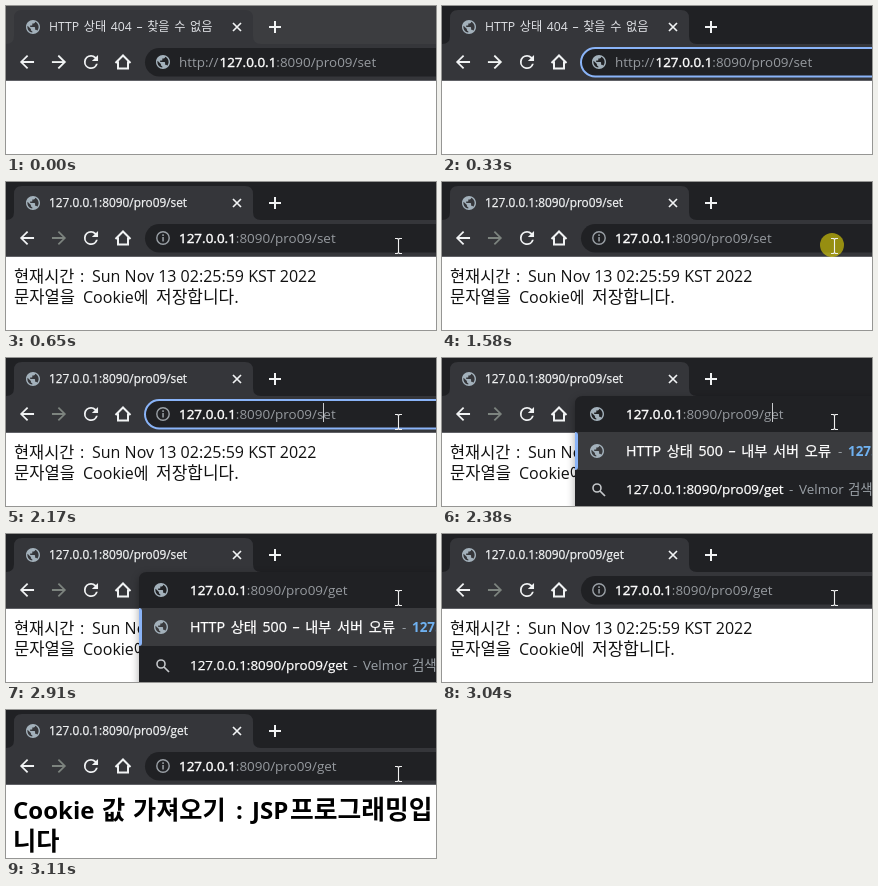
Recreate the animation shown at these times as an HTML page. Size 430 by 148 pixels, loop 3970 ms.

```html
<!DOCTYPE html>
<html lang="ko">
<head>
<meta charset="utf-8">
<title>Cookie</title>
<style>
html, body { margin: 0; width: 100%; height: 100%; overflow: hidden; background: #fff; }
svg { display: block; width: 430px; height: 148px; }
text { font-family: 'Open Sans', 'Noto Sans CJK KR', 'Noto Sans CJK', sans-serif; white-space: pre; }
.tab { font-size: 11.85px; fill: #f1f3f4; stroke: #f1f3f4; stroke-width: .25px; }
.url { font-size: 13.45px; fill: #969a9f; }
.host { fill: #fff; stroke: #fff; stroke-width: .4px; }
.page { font-size: 16px; fill: #111; }
.head { font-size: 24px; font-weight: 700; fill: #000; }
.row { font-size: 13.45px; fill: #fff; }
.strong { stroke: #fff; stroke-width: .25px; }
.line { fill: none; stroke: #f1f3f4; stroke-width: 2; }
.globe { fill: #a3b1bb; }
.caret { fill: #c8cacd; }

/* Each part is shown only during its own window of the loop. */
.t { opacity: 0; animation: 3970ms step-end infinite; }
.idle { animation-name: idle; }
.typed { animation-name: typed; }
.focus1 { animation-name: focus1; }
.caret1 { animation-name: caret1; }
.loaded { animation-name: loaded; }
.tabSet { animation-name: tabSet; }
.urlSet { animation-name: urlSet; }
.pageSet { animation-name: pageSet; }
.click { animation-name: click; }
.focus2 { animation-name: focus2; }
.picked { animation-name: picked; }
.caret2 { animation-name: caret2; }
.cut { animation-name: cut; }
.popup { animation-name: popup; }
.caret3 { animation-name: caret3; }
.navGet { animation-name: navGet; }
.pageGet { animation-name: pageGet; }
@keyframes idle { 0% { opacity: 1 } 1.76% { opacity: 0 } }
@keyframes typed { 0% { opacity: 1 } 14.86% { opacity: 0 } }
@keyframes focus1 { 1.76% { opacity: 1 } 14.86% { opacity: 0 } }
@keyframes caret1 { 1.76% { opacity: 1 } 8.31% { opacity: 0 } }
@keyframes loaded { 14.86%, 100% { opacity: 1 } }
@keyframes tabSet { 14.86% { opacity: 1 } 76.57% { opacity: 0 } }
@keyframes urlSet { 14.86% { opacity: 1 } 56.42% { opacity: 0 } }
@keyframes pageSet { 16.37% { opacity: 1 } 78.33% { opacity: 0 } }
@keyframes click { 39.79% { opacity: 1 } 43.07% { opacity: 0 } }
@keyframes focus2 { 41.3% { opacity: 1 } 58.18% { opacity: 0 } }
@keyframes picked { 41.3% { opacity: 1 } 54.65% { opacity: 0 } }
@keyframes caret2 { 54.65% { opacity: 1 } 56.42% { opacity: 0 } }
@keyframes cut { 56.42% { opacity: 1 } 58.18% { opacity: 0 } }
@keyframes popup { 58.18% { opacity: 1 } 76.57% { opacity: 0 } }
@keyframes caret3 { 58.18% { opacity: 1 } 73.29% { opacity: 0 } }
@keyframes navGet { 76.57%, 100% { opacity: 1 } }
@keyframes pageGet { 78.33%, 100% { opacity: 1 } }
</style>
</head>
<body>
<svg viewBox="0 0 430 148">
  <defs>
    <path id="globe" transform="scale(.7) translate(-12 -12)" d="M12 2C6.48 2 2 6.48 2 12s4.48 10 10 10 10-4.48 10-10S17.52 2 12 2zm-1 17.93c-3.95-.49-7-3.85-7-7.93 0-.62.08-1.21.21-1.79L9 15v1c0 1.1.9 2 2 2v1.93zm6.9-2.54c-.26-.81-1-1.39-1.9-1.39h-1v-3c0-.55-.45-1-1-1H8v-2h2c.55 0 1-.45 1-1V7h2c1.1 0 2-.9 2-2v-.41c2.93 1.19 5 4.06 5 7.41 0 2.08-.8 3.97-2.1 5.39z"/>
    <path id="arrow" transform="scale(.88) translate(-12 -12)" d="M20 11H7.83l5.59-5.59L12 4l-8 8 8 8 1.41-1.41L7.83 13H20z"/>
    <rect id="ring" x="139" y="42" width="320" height="28.5" rx="14.25" fill="none" stroke="#8ab4f8" stroke-width="2"/>
    <filter id="shadow" x="-10%" y="-20%" width="120%" height="140%"><feGaussianBlur stdDeviation="4"/></filter>
  </defs>

  <!-- page -->
  <rect width="430" height="148" fill="#fff"/>
  <g class="t pageSet page">
    <text y="100"><tspan x="8" font-size="16.4">현재시간</tspan><tspan x="74">:</tspan><tspan x="86">Sun Nov 13 02:25:59 KST 2022</tspan></text>
    <text y="121"><tspan x="8" font-size="16.6">문자열을</tspan><tspan x="77">Cookie에</tspan><tspan x="150" font-size="17">저장합니다.</tspan></text>
  </g>
  <g class="t pageGet head">
    <text y="109"><tspan x="7">Cookie</tspan><tspan x="96" font-size="25.2">값</tspan><tspan x="127" font-size="25.2">가져오기</tspan><tspan x="230">:</tspan><tspan x="246">JSP</tspan><tspan x="284" font-size="25.8">프로그래밍입</tspan></text>
    <text x="7" y="140" font-size="25.2">니다</text>
  </g>

  <!-- tab strip -->
  <rect width="430" height="39" fill="#202124"/>
  <rect class="t idle" width="430" height="39" fill="#3c3d40"/>
  <path d="M0 38Q8 38 8 30V12Q8 4 16 4H239Q247 4 247 12V30Q247 38 255 38Z" fill="#35363a"/>
  <use class="globe" href="#globe" x="27" y="21"/>
  <text class="tab t typed" x="43" y="25" style="font-size:12.2px;word-spacing:1.5px;stroke:none;fill:#dfe1e5">HTTP 상태 404 – 찾을 수 없음</text>
  <text class="tab t tabSet" x="43" y="25">127.0.0.1:8090/pro09/set</text>
  <text class="tab t navGet" x="43" y="25">127.0.0.1:8090/pro09/get</text>
  <path class="line" d="M227 17l8 8m0-8l-8 8" style="stroke-width:1.7"/>
  <path class="line" d="M263 21h12m-6-6v12"/>

  <!-- toolbar -->
  <rect y="38" width="430" height="36" fill="#35363a"/>
  <rect y="74" width="430" height="1" fill="#606166"/>
  <use href="#arrow" x="21" y="56" fill="#f1f3f4"/>
  <use href="#arrow" transform="translate(53 56) scale(-1 1)" fill="#7d847f"/>
  <use class="t typed" href="#arrow" transform="translate(53 56) scale(-1 1)" fill="#f1f3f4"/>
  <path transform="translate(85 56) scale(.88) translate(-12 -12)" fill="#f1f3f4" d="M17.65 6.35A7.96 7.96 0 0 0 12 4a8 8 0 1 0 7.73 10h-2.08A6 6 0 1 1 12 6c1.66 0 3.14.69 4.22 1.78L13 11h7V4z"/>
  <path class="line" d="M109.500 57L117 49.500 124.500 57M112 55.500V62.500H122V55.500"/>
  <rect x="139" y="42" width="320" height="28.5" rx="14.25" fill="#202124"/>

  <!-- address bar -->
  <g class="t typed">
    <use class="globe" href="#globe" x="157" y="56"/>
    <text class="url" x="173" y="61">http://<tspan class="host" x="213.500">127.0.0.1</tspan>:8090/pro09/set</text>
  </g>
  <use class="t focus1" href="#ring"/>
  <rect class="t caret1 caret" x="370" y="45" width="1" height="19"/>
  <g class="t loaded">
    <circle class="line" cx="157" cy="56" r="6.2" style="stroke:#9aa0a6;stroke-width:1.4"/>
    <path d="M156.300 55h1.500v4.500h-1.500zM156.300 52.300h1.500v1.600h-1.500z" fill="#9aa0a6"/>
  </g>
  <text class="url t urlSet" x="173" y="61"><tspan class="host">127.0.0.1</tspan>:8090/pro09/set</text>
  <text class="url t cut" x="173" y="61"><tspan class="host">127.0.0.1</tspan>:8090/pro09/et</text>
  <text class="url t navGet" x="173" y="61"><tspan class="host">127.0.0.1</tspan>:8090/pro09/get</text>
  <g class="t picked">
    <rect x="173" y="46" width="157" height="19" fill="#99c8ff"/>
    <text class="url" x="173" y="61" style="fill:#202124">127.0.0.1:8090/pro09/set</text>
  </g>
  <use class="t focus2" href="#ring"/>
  <rect class="t caret2 caret" x="317" y="45" width="1" height="19"/>
  <rect class="t cut caret" x="310" y="45" width="1" height="19"/>

  <!-- suggestions -->
  <g class="t popup">
    <rect x="133" y="41" width="320" height="130" rx="8" opacity=".35" filter="url(#shadow)"/>
    <path d="M133 148V46Q133 38 141 38H430V148Z" fill="#202124"/>
    <rect x="133" y="74" width="297" height="38" fill="#3a3b3e"/>
    <path d="M133 74q3 0 3 3v32q0 3-3 3z" fill="#8ab4f8"/>
    <use class="globe" href="#globe" x="155" y="56"/>
    <text class="url" x="184" y="61"><tspan class="host">127.0.0.1</tspan>:8090/pro09/get</text>
    <use class="globe" href="#globe" x="155" y="93"/>
    <text class="row strong" x="184" y="98" style="font-size:14.2px;word-spacing:2px">HTTP 상태 500 – 내부 서버 오류</text>
    <text class="row" y="98"><tspan x="396" fill="#9aa0a6">-</tspan><tspan x="406" fill="#6fb1f0" font-weight="700">127.0.0.1:8090/pro09/get</tspan></text>
    <path class="line" d="M158 133l5 5" style="stroke:#c4c7ca;stroke-width:1.7"/>
    <circle class="line" cx="155" cy="130" r="4" style="stroke:#c4c7ca;stroke-width:1.6"/>
    <text class="row strong" x="184" y="136">127.0.0.1:8090/pro09/get</text>
    <text class="row" y="136" style="fill:#9aa0a6"><tspan x="347">-</tspan><tspan x="357">Velmor</tspan><tspan x="406">검색</tspan></text>
  </g>
  <rect class="t caret3 caret" x="330" y="45" width="1" height="19"/>

  <!-- pointer -->
  <circle class="t click" cx="390" cy="63" r="12" fill="#fff000" style="fill-opacity:.53"/>
  <path class="t loaded line" d="M389 56.500h2.500l1 1 1-1H396M392.500 57.500V70.500M389 71.500h2.500l1-1 1 1H396" style="stroke:#f0f0f0;stroke-width:1.1"/>
</svg>
</body>
</html>
```
